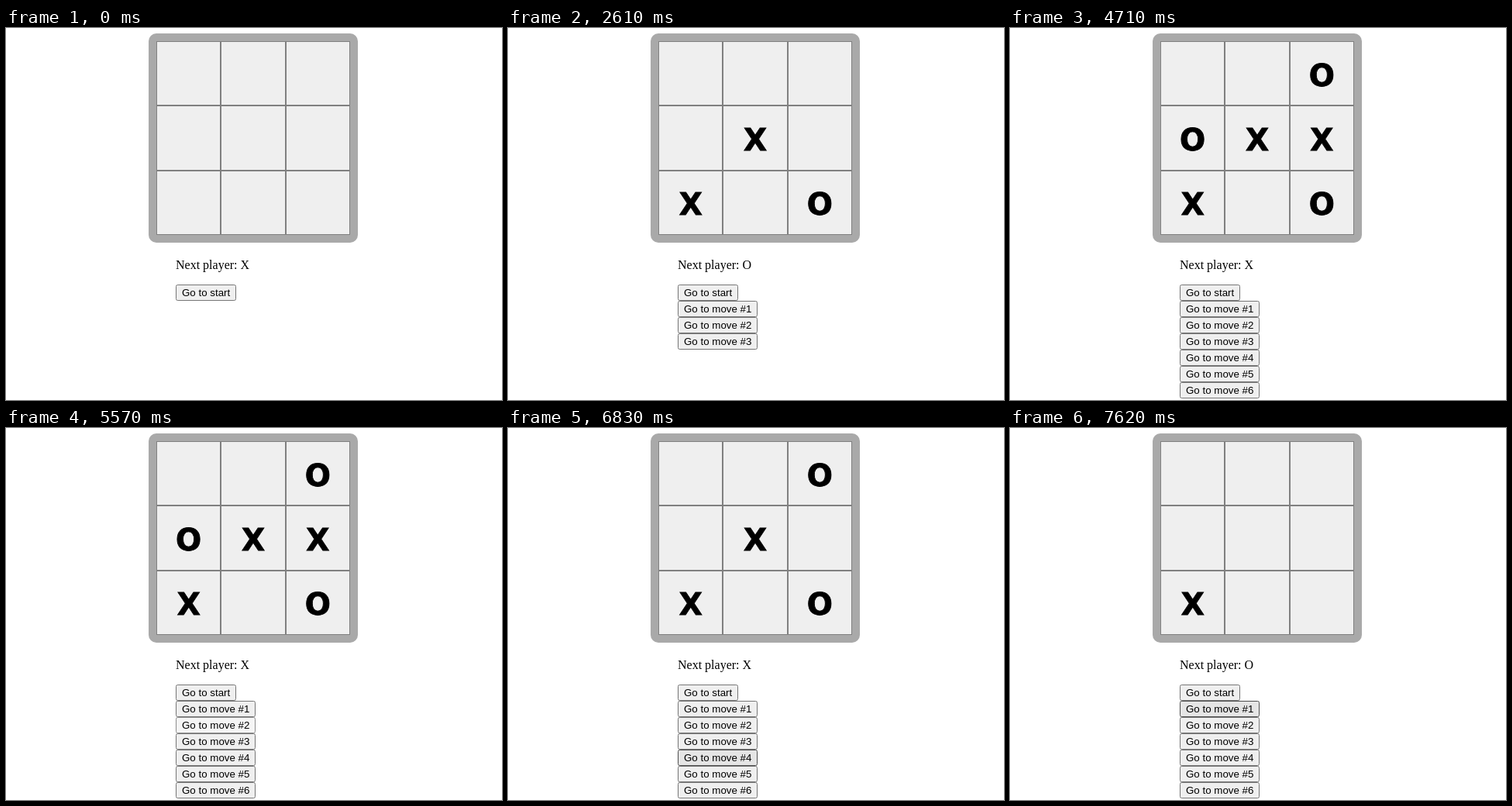
These frames come from a looping animation (640 px wide and 480 px high, 8000 ms). An HTML page:

```html
<!DOCTYPE html>
<html lang="en">
<head>
<meta charset="utf-8">
<title>Tic-tac-toe</title>
<style>
  html, body { margin: 0; width: 100%; height: 100%; overflow: hidden; background: #fff; }
  svg { display: block; width: 640px; height: 480px; }
  .mark { font: bold 39px "DejaVu Sans", sans-serif; text-anchor: middle; stroke: #000; stroke-width: 0.9; }
  .status { font: 16px "Liberation Serif", "Times New Roman", serif; }
  .button text { font: 13.3333px "Liberation Sans", Arial, sans-serif; }
  .button rect { fill: #efefef; stroke: #767676; }
  .button.hover rect { fill: #e5e5e5; stroke: #4f4f4f; }
  .button.press rect { fill: #f5f5f5; stroke: #8d8d8d; }
</style>
</head>
<body>
<svg id="stage" viewBox="0 0 640 480">
  <rect x="184" y="7" width="270" height="270" rx="10" fill="#a9a9a9"/>
</svg>
<script>
const LOOP = 8000;
const CELL = 250 / 3;

const plays = [
  { at: 1070, cell: 6 },
  { at: 1680, cell: 8 },
  { at: 2610, cell: 4 },
  { at: 3230, cell: 2 },
  { at: 3930, cell: 5 },
  { at: 4710, cell: 3 }
];

// The pointer crosses one button per pace, then clicks the last one
const visits = [
  { enter: 5180, from: 0, to: 2, pace: 80, press: 5570, release: 5730 },
  { enter: 6050, from: 3, to: 4, pace: 230, press: 6750, release: 6830 },
  { enter: 7140, from: 3, to: 1, pace: 85, press: 7540, release: 7620 }
];

const stage = document.getElementById("stage");

function add(parent, tag, attrs, text = "") {
  const node = document.createElementNS("http://www.w3.org/2000/svg", tag);
  for (const key in attrs) node.setAttribute(key, attrs[key]);
  node.textContent = text;
  return parent.appendChild(node);
}

const edge = i => Math.round(i * CELL);
const player = move => move % 2 ? "O" : "X";
const show = (node, on) => node.setAttribute("visibility", on ? "visible" : "hidden");

for (let row = 0; row < 3; row++) {
  for (let col = 0; col < 3; col++) {
    add(stage, "rect", {
      x: 194.5 + edge(col), y: 17.5 + edge(row),
      width: edge(col + 1) - edge(col) - 1,
      height: edge(row + 1) - edge(row) - 1,
      fill: "#efefef", stroke: "#808080"
    });
  }
}

const marks = plays.map(({ cell }, i) => add(stage, "text", {
  class: "mark",
  x: 194 + (cell % 3 + 0.5) * CELL,
  y: 75.3 + Math.floor(cell / 3) * 83
}, player(i)));

const status = add(stage, "text", { class: "status", x: 219, y: 311 });

const buttons = Array.from({ length: plays.length + 1 }, (_, i) => {
  const group = add(stage, "g", {});
  const top = 331 + i * 21;
  add(group, "rect", { x: 219.5, y: top + 0.5, width: i ? 102 : 77, height: 20, rx: 2 });
  add(group, "text", { x: 227, y: top + 15 }, i ? "Go to move #" + i : "Go to start");
  return group;
});

function pointedButton(visit, time) {
  const distance = visit.to - visit.from;
  const crossed = Math.floor((time - visit.enter) / visit.pace);
  return visit.from + Math.sign(distance) * Math.min(Math.abs(distance), crossed);
}

function render(time) {
  const played = plays.filter(play => play.at <= time).length;
  const clicked = visits.findLast(visit => visit.release <= time);
  const visit = visits.findLast(visit => visit.enter <= time);
  const move = clicked ? clicked.to : played;
  const pointed = visit ? pointedButton(visit, time) : -1;
  const pressed = visit && time >= visit.press && time < visit.release;

  marks.forEach((mark, i) => show(mark, i < move));
  status.textContent = "Next player: " + player(move);
  buttons.forEach((button, i) => {
    const state = i !== pointed ? "" : pressed ? " press" : " hover";
    button.setAttribute("class", "button" + state);
    show(button, i <= played);
  });
}

const start = performance.now();
function tick() {
  render((performance.now() - start) % LOOP);
  requestAnimationFrame(tick);
}
tick();
</script>
</body>
</html>
```
